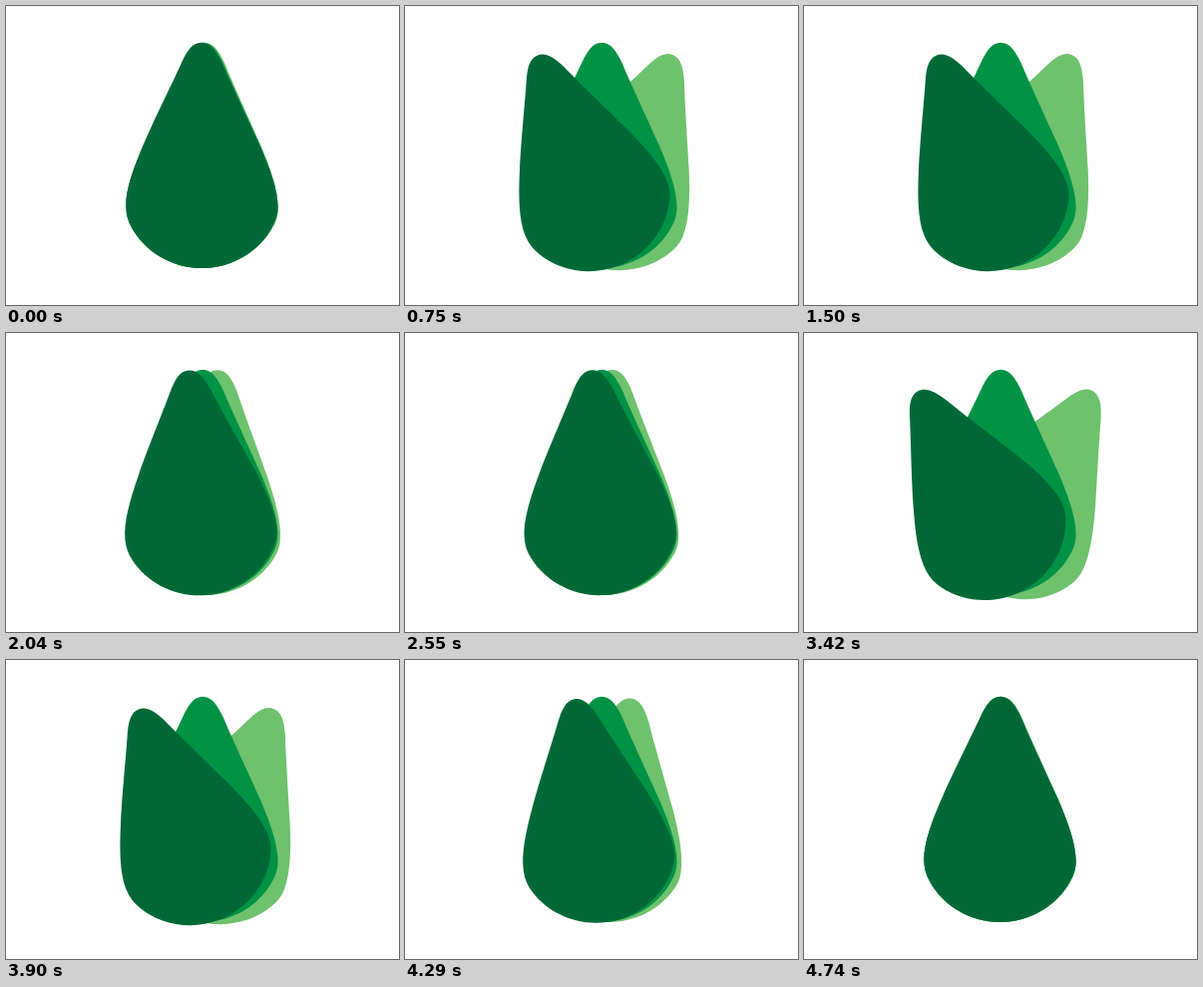
An HTML page that plays this animation: 394x300 px, repeating every 4.77 s.

```html
<!DOCTYPE html>
<html lang="en">
<head>
<meta charset="utf-8">
<title>Opening petals</title>
<style>
  html, body { margin: 0; width: 100%; height: 100%; overflow: hidden; background: #fefefe; }
  svg { display: block; width: 394px; height: 300px; }
</style>
</head>
<body>
<svg viewBox="0 0 394 300">
  <defs>
    <path id="petal" d="M197.2 36.8
      C206 36.8 212 45 218 58 C225 75 240 107 254 138
      C264 161 272.6 184 272.6 202 C272.6 209 271 215 267 222
      C254 246 227 263 196.7 263 C166 263 139 246 126 222
      C122 215 120.3 208 120.3 200 C120.3 183 128.5 161 138.7 138
      C152.5 107 169 75 176.8 58 C182.8 45 188.4 36.8 197.2 36.8Z"/>
  </defs>
  <use id="right" href="#petal" fill="#6ec16d"/>
  <use href="#petal" fill="#009245"/>
  <use id="left" href="#petal" fill="#006837"/>
</svg>
<script>
  const LOOP = 4770, STEP = 30, CYCLE = 2400, PEAK = 1125;
  const REST = 0.15, SWING = 29.3;
  const left = document.getElementById('left');
  const right = document.getElementById('right');

  // Opening angle in degrees: a softened swing, resting briefly when closed.
  function angleAt(t) {
    let d = Math.abs(t % CYCLE - PEAK);
    d = Math.min(d, CYCLE - d);
    const x = Math.min(1, d / 1152);
    const wave = (1 + Math.cos(Math.PI * x)) / 2;
    return REST + SWING * (wave + 1 - x) / 2;
  }

  function draw(t) {
    const a = angleAt(t);
    left.setAttribute('transform', `rotate(${-a} 199 215)`);
    right.setAttribute('transform', `rotate(${a} 200.3 233)`);
  }

  const start = performance.now();
  function tick() {
    const t = (performance.now() - start) % LOOP;
    draw(Math.floor(t / STEP) * STEP);
    requestAnimationFrame(tick);
  }
  tick();
</script>
</body>
</html>
```
